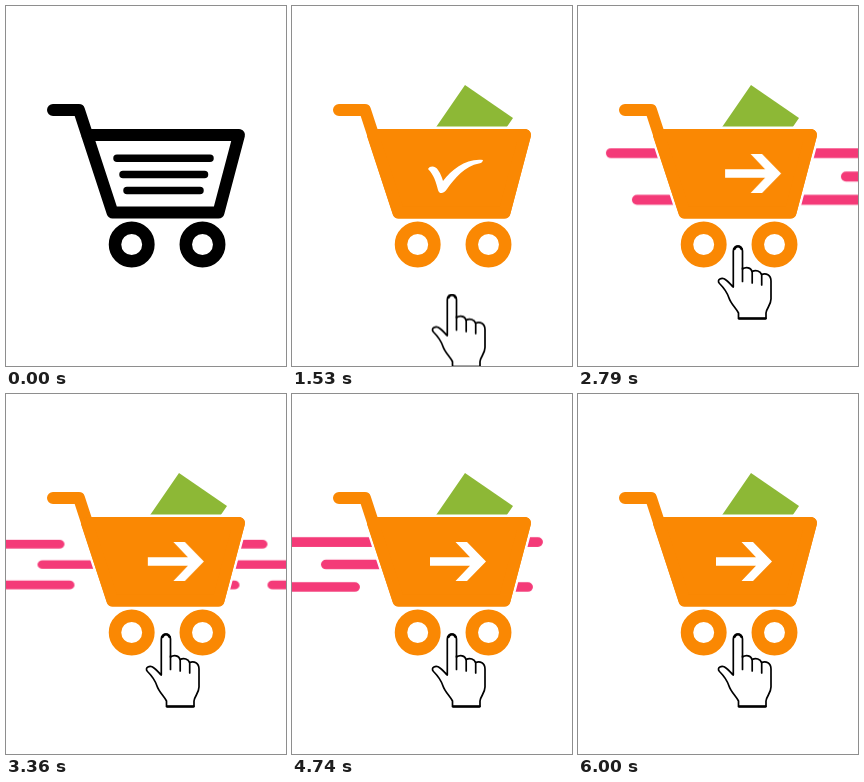
Write an HTML page that moves like this. It is 280 px wide and 360 px high and loops after 6600 ms.

```html
<!DOCTYPE html>
<html lang="en">
<head>
<meta charset="utf-8">
<title>Shopping cart</title>
<style>
  html, body { margin: 0; width: 100%; height: 100%; overflow: hidden; background: #fff; }
  svg { display: block; width: 100vw; height: 100vh; }

  .anim { animation: 6.6s linear infinite both; }

  .outline { animation-name: fade-out; }
  .box { animation-name: drop; }
  .filled { animation-name: fade-in; }
  .tick { animation-name: tick; }
  .arrow { animation-name: arrow-show; }
  .arrow path { animation-name: arrow-sway; }
  .hand { animation-name: rise; }
  .spread { animation-name: spread; transform-origin: 0 170.5px; }
  .dashes { animation-name: rush; }

  .cart { fill: none; stroke-width: 12; stroke-linecap: round; stroke-linejoin: round; }
  .halo { stroke: #fff; stroke-width: 17; }
  .dashes { stroke: #f43a78; stroke-width: 10; stroke-linecap: round; }

  @keyframes drop {
    0% { transform: translateY(-162px); }
    5.91%, 100% { transform: none; }
  }
  @keyframes fade-out {
    0%, 6.09% { opacity: 1; }
    10%, 100% { opacity: 0; }
  }
  @keyframes fade-in {
    0%, 6.09% { opacity: 0; }
    10%, 100% { opacity: 1; }
  }
  @keyframes tick {
    0%, 9.89% { opacity: 0; }
    9.9%, 31.2% { opacity: 1; }
    35.9%, 100% { opacity: 0; }
  }
  @keyframes arrow-show {
    0%, 31.2% { opacity: 0; }
    35.9%, 100% { opacity: 1; }
  }
  @keyframes arrow-sway {
    0%, 39.85% { transform: none; animation-timing-function: cubic-bezier(.39, .575, .565, 1); }
    45.94% { transform: translateX(15px); animation-timing-function: cubic-bezier(.47, 0, .745, .715); }
    52.05% { transform: none; animation-timing-function: cubic-bezier(.39, .575, .565, 1); }
    58.2% { transform: translateX(-6.7px); animation-timing-function: cubic-bezier(.47, 0, .745, .715); }
    64.4%, 100% { transform: none; }
  }
  @keyframes rise {
    0%, 19.09% { transform: translateY(122px); }
    25.91%, 100% { transform: none; }
  }
  @keyframes rush {
    0%, 35.9% { transform: translateX(50.4px); visibility: hidden; }
    35.91% { transform: translateX(50.4px); visibility: visible; }
    90.89% { transform: translateX(-385px); visibility: visible; }
    90.9%, 100% { transform: translateX(-385px); visibility: hidden; }
  }
  @keyframes spread {
    0%, 35.91% { transform: scaleY(1.086); }
    52.83%, 60.26% { transform: scaleY(.84); }
    90.9%, 100% { transform: scaleY(1.147); }
  }
</style>
</head>
<body>
<svg viewBox="0 0 280 360">
  <defs>
    <path id="frame" d="M47 104H73L106.500 206.500H212.500L233 129H81"/>
    <path id="basket" d="M81 129L106.500 206.500H212.500L233 129Z"/>
    <g id="wheels" stroke-width="12.500">
      <circle cx="125.700" cy="238.500" r="16.700"/>
      <circle cx="196.500" cy="238.500" r="16.700"/>
    </g>
  </defs>

  <g class="anim spread">
    <g class="anim dashes">
      <path d="M33 147H122M165 147H325M365 147H480"/>
      <path d="M105 170.500H224M268 170.500H395"/>
      <path d="M59 194H132M196 194H297M335 194H470"/>
    </g>
  </g>

  <g class="anim outline cart" stroke="#000">
    <use href="#frame"/>
    <use href="#wheels"/>
    <path stroke-width="7.500" d="M111 152.300H204M117 168.500H198.500M121 184.500H194"/>
  </g>

  <path class="anim box" fill="#8db836" d="M173 79L221 112L188 160L140 127Z"/>

  <g class="anim filled cart" stroke="#fa8803">
    <use href="#frame" class="halo"/>
    <use href="#frame"/>
    <use href="#basket" fill="#fa8803"/>
    <use href="#wheels"/>
  </g>

  <path class="anim tick" fill="#fff" d="M136 163C138 159 144 160 146 164C149 168 150 172 151 175C160 163 175 152 191 154C190.500 156 190 157 187 157.500C173 160 163 172 155 183C152 188 147 188.500 146 184C144 176 142 169 136 163Z"/>
  <g class="anim arrow">
    <path class="anim" fill="#fff" d="M138 163.300H178L163.500 148H175L194 167.500L175 187H163.500L178 171.700H138Z"/>
  </g>

  <g class="anim hand" fill="#fff" stroke="#000" stroke-width="1.700" stroke-linecap="round" stroke-linejoin="round">
    <path d="M155.300 281V245C155.300 238.500 164.500 238.500 164.500 245V263C168 260.500 173 261.500 174 265.500C178 263.500 182.500 265 183.500 268.500C188 266.500 193 269 193 275V293C193 299 188.500 302 188 307V312.500H160.500V307C158 302 153 298 151 292C149 286 147 283 141.500 277.500C138 273.500 144 270.500 148 274C151 276 153 279 155.300 281Z"/>
    <path fill="none" d="M164.500 262V275.500M174.200 265.500V277M183.700 268.500V279"/>
    <path fill="none" stroke-width="2.300" d="M156.500 243C158 239.500 162 239.500 163.500 243M161 312.500H187.500"/>
  </g>
</svg>
</body>
</html>
```
